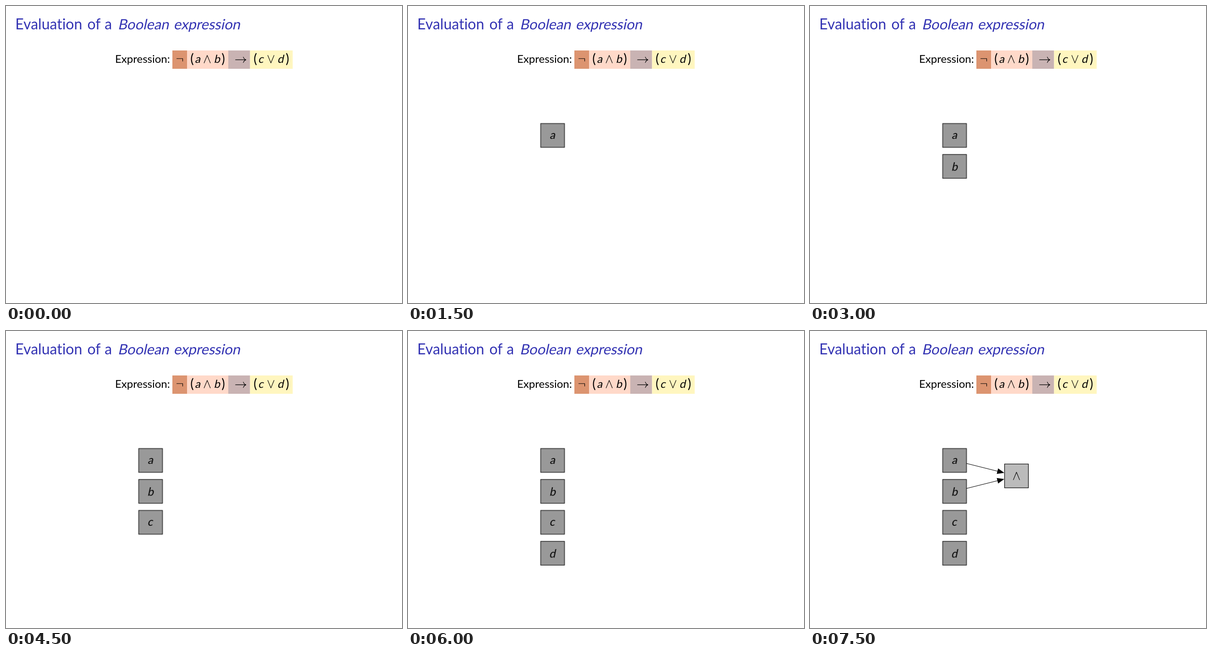
Write an HTML page that moves like this. It is 864 by 648 pixels and loops after 8000 ms.

```html
<!DOCTYPE html>
<html lang="en">
<head>
<meta charset="utf-8">
<title>Evaluation of a Boolean expression</title>
<style>
  html, body { margin: 0; width: 100%; height: 100%; overflow: hidden; background: #fff; }
  svg { display: block; width: 864px; height: 648px; }
  text { font: 24px Lato, "Open Sans", sans-serif; font-variant-ligatures: none; }
  .title text { font-size: 32px; fill: #3333b3; }
  .title .oblique { font-size: 31px; }
  .paren text { font-size: 28px; text-anchor: middle; }
  .symbol { fill: none; stroke: #000; stroke-width: 1.15; stroke-linecap: round; stroke-linejoin: round; }
  .box { stroke: #000; stroke-width: 1.2; }
  .step { animation: 8s step-end infinite; }
  .a { animation-name: show-a; }
  .b { animation-name: show-b; }
  .c { animation-name: show-c; }
  .d { animation-name: show-d; }
  .and { animation-name: show-and; }
  @keyframes show-a { 0% { opacity: 0 } 18.75%, to { opacity: 1 } }
  @keyframes show-b { 0% { opacity: 0 } 37.5%, to { opacity: 1 } }
  @keyframes show-c { 0% { opacity: 0 } 56.25%, to { opacity: 1 } }
  @keyframes show-d { 0% { opacity: 0 } 75%, to { opacity: 1 } }
  @keyframes show-and { 0% { opacity: 0 } 93.75%, to { opacity: 1 } }
</style>
</head>
<body>
<svg viewBox="0 0 864 648">
  <defs>
    <rect id="node" class="box" width="52" height="52"/>
    <path id="wedge" class="symbol" d="M-6.8 8.3 L0 -8.3 L6.8 8.3"/>
    <g id="arrow">
      <path class="symbol" d="M0 0H72"/>
      <path d="M84.8 0L69.3 -6.2V6.2Z"/>
    </g>
  </defs>

  <g class="title">
    <text y="51"><tspan x="20.3">Evaluation</tspan> <tspan x="177.5">of</tspan> <tspan x="215.2">a</tspan></text>
    <text class="oblique" transform="translate(243.8 51) skewX(-12)">Boolean</text>
    <text class="oblique" transform="translate(365.5 51) skewX(-12)">expression</text>
  </g>

  <text x="238" y="124">Expression:</text>
  <rect x="363" y="97" width="32" height="40" fill="#dc9470"/>
  <rect x="395" y="97" width="90" height="40" fill="#ffd9c9"/>
  <rect x="485" y="97" width="47.5" height="40" fill="#c9b3b3"/>
  <rect x="532.5" y="97" width="93" height="40" fill="#fff6bf"/>

  <g class="paren">
    <text x="406" y="124.5">(</text>
    <text x="474" y="124.5">)</text>
    <text x="544" y="124.5">(</text>
    <text x="614" y="124.5">)</text>
  </g>
  <path class="symbol" d="M372.5 114.7H385.5V120.3"/>
  <text transform="translate(412 124) skewX(-12)">a</text>
  <use href="#wedge" x="439" y="116"/>
  <text transform="translate(453.5 124) skewX(-12)">b</text>
  <path class="symbol" d="M500.8 117.4H523.3M517.8 111.4Q519.3 115.8 523.6 117.4Q519.3 119 517.8 123.4"/>
  <text transform="translate(550 124) skewX(-12)">c</text>
  <use href="#wedge" transform="translate(578 116) scale(1 -1)"/>
  <text transform="translate(592 124) skewX(-12)">d</text>

  <g fill="#999">
    <use class="step a" href="#node" x="289.5" y="256.4"/>
    <use class="step b" href="#node" x="289.5" y="323.9"/>
    <use class="step c" href="#node" x="289.5" y="391.4"/>
    <use class="step d" href="#node" x="289.5" y="458.9"/>
  </g>
  <g class="step a"><text transform="translate(309 289.5) skewX(-12)">a</text></g>
  <g class="step b"><text transform="translate(308.5 359) skewX(-12)">b</text></g>
  <g class="step c"><text transform="translate(308.5 424.5) skewX(-12)">c</text></g>
  <g class="step d"><text transform="translate(308 494) skewX(-12)">d</text></g>

  <g class="step and">
    <use href="#node" x="424.5" y="290.2" fill="#bbb"/>
    <use href="#wedge" x="450.5" y="316.3"/>
    <use href="#arrow" transform="translate(341.7 289) rotate(14.04)"/>
    <use href="#arrow" transform="translate(341.7 343.5) rotate(-14.04)"/>
  </g>
</svg>
</body>
</html>
```
